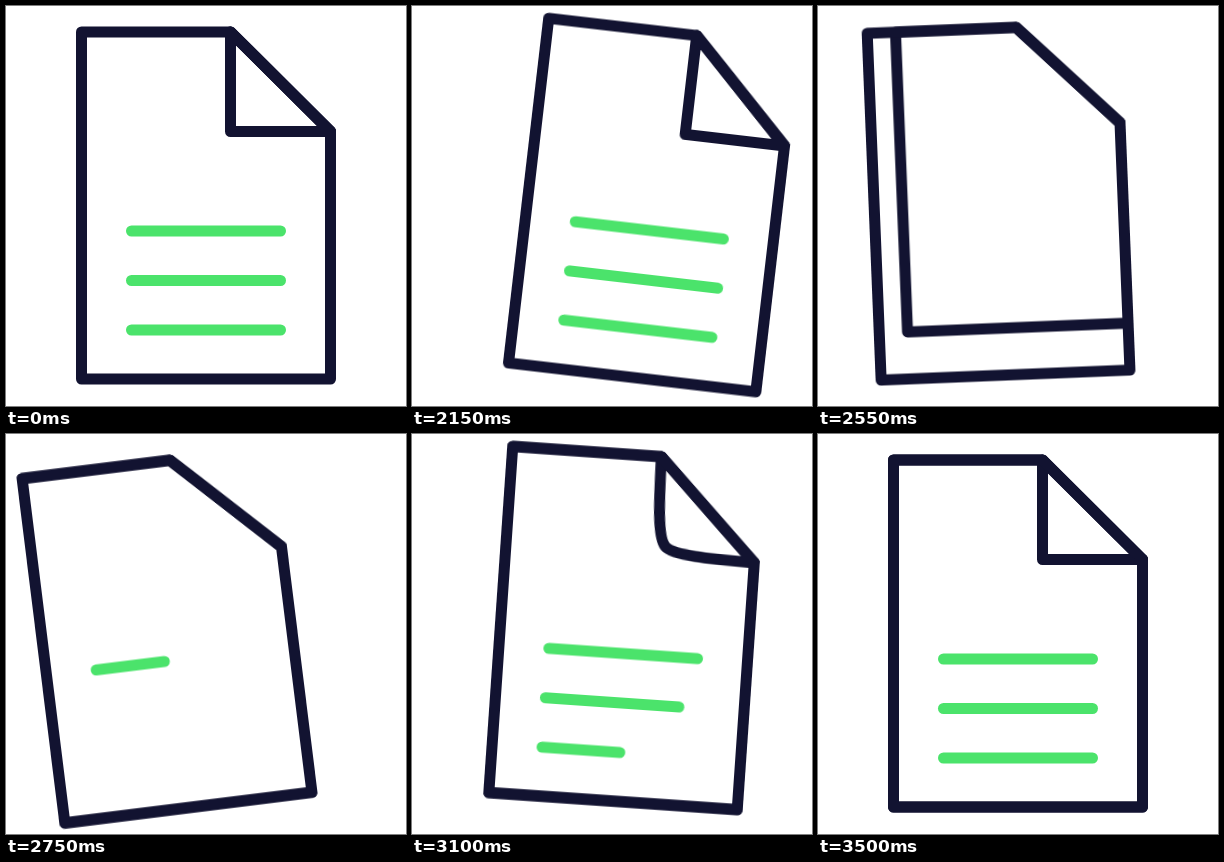
An HTML page without scripts that plays this animation: 400x400 px, repeating every 3520 ms.

```html
<!DOCTYPE html>
<html lang="en">
<head>
<meta charset="utf-8">
<title>Turning page</title>
<style>
  html, body { margin: 0; width: 100%; height: 100%; overflow: hidden; background: #fff; }
  svg { display: block; width: 100%; height: 100%; }

  g, path {
    animation: 3520ms cubic-bezier(.33, 0, .24, 1) infinite both;
  }
  path {
    fill: none;
    stroke: #121331;
    stroke-width: 11;
    stroke-linecap: round;
    stroke-linejoin: round;
  }
  .text { stroke: #4be36b; }

  .slide { animation-name: slide; }
  .lift { animation-name: lift; animation-timing-function: cubic-bezier(.37, 0, .63, 1); }
  .tilt { animation-name: tilt; transform-origin: 200px 199.5px; }
  .turn { animation-name: turn; fill: #fff; }
  .curl { animation-name: curl; }
  .write { animation-name: write; stroke-dasharray: 1 2; }
  .second { animation-delay: 180ms; }
  .third { animation-delay: 335ms; }

  @keyframes slide {
    0%, 56.68% { transform: translateX(0); }
    66.1% { transform: translateX(55px); }
    78.4% { transform: translateX(-39px); }
    91.8% { transform: translateX(16px); }
    99.4%, 100% { transform: translateX(0); }
  }
  @keyframes lift {
    0%, 56.68% { transform: translateY(0); }
    66.1% { transform: translateY(-1px); }
    70.2% { transform: translateY(-5px); }
    78.4% { transform: translateY(2px); }
    91.8% { transform: translateY(-7px); }
    99.4%, 100% { transform: translateY(0); }
  }
  @keyframes tilt {
    0%, 56.68% { transform: rotate(0deg); }
    66% { transform: rotate(9deg); }
    80.7% { transform: rotate(-7.4deg); }
    91.8% { transform: rotate(5deg); }
    99.4%, 100% { transform: rotate(0deg); }
  }
  /* The folded corner sweeps across the sheet and covers the old text. */
  @keyframes turn {
    0%, 66% { d: path("M224.5 26 L224.5 125.5 L324.5 125.5 L324.5 125.5 L224.5 26 Z"); }
    78.1%, 100% { d: path("M75.5 26 L75.5 373 L324.5 373 L324.5 125.5 L224.5 26 Z"); }
  }
  /* A new corner bends out of the diagonal edge. */
  @keyframes curl {
    0%, 78.1% { d: path("M224.5 26 C229 31 232 33 274.5 75.7 C317 118 320 121 324.5 125.5"); }
    97.2%, 100% { d: path("M224.5 26 C224.5 80 224.5 125.5 224.5 125.5 C224.5 125.5 270 125.5 324.5 125.5"); }
  }
  @keyframes write {
    0%, 73.15% { stroke-dashoffset: 1.02; }
    88.5%, 100% { stroke-dashoffset: 0; }
  }
</style>
</head>
<body>
<svg viewBox="0 0 400 400">
  <g class="slide"><g class="lift"><g class="tilt">
    <path class="text" d="M125.5 225H274.5M125.5 274.5H274.5M125.5 324H274.5"/>
    <path class="turn" d="M224.5 26 L224.5 125.5 L324.5 125.5 L324.5 125.5 L224.5 26 Z"/>
    <path class="text write" pathLength="1" d="M125.5 225H274.5"/>
    <path class="text write second" pathLength="1" d="M125.5 274.5H274.5"/>
    <path class="text write third" pathLength="1" d="M125.5 324H274.5"/>
    <path class="curl" d="M224.5 26 C229 31 232 33 274.5 75.7 C317 118 320 121 324.5 125.5"/>
    <path d="M75.5 26H224.5L324.5 125.5V373H75.5Z"/>
  </g></g></g>
</svg>
</body>
</html>
```
